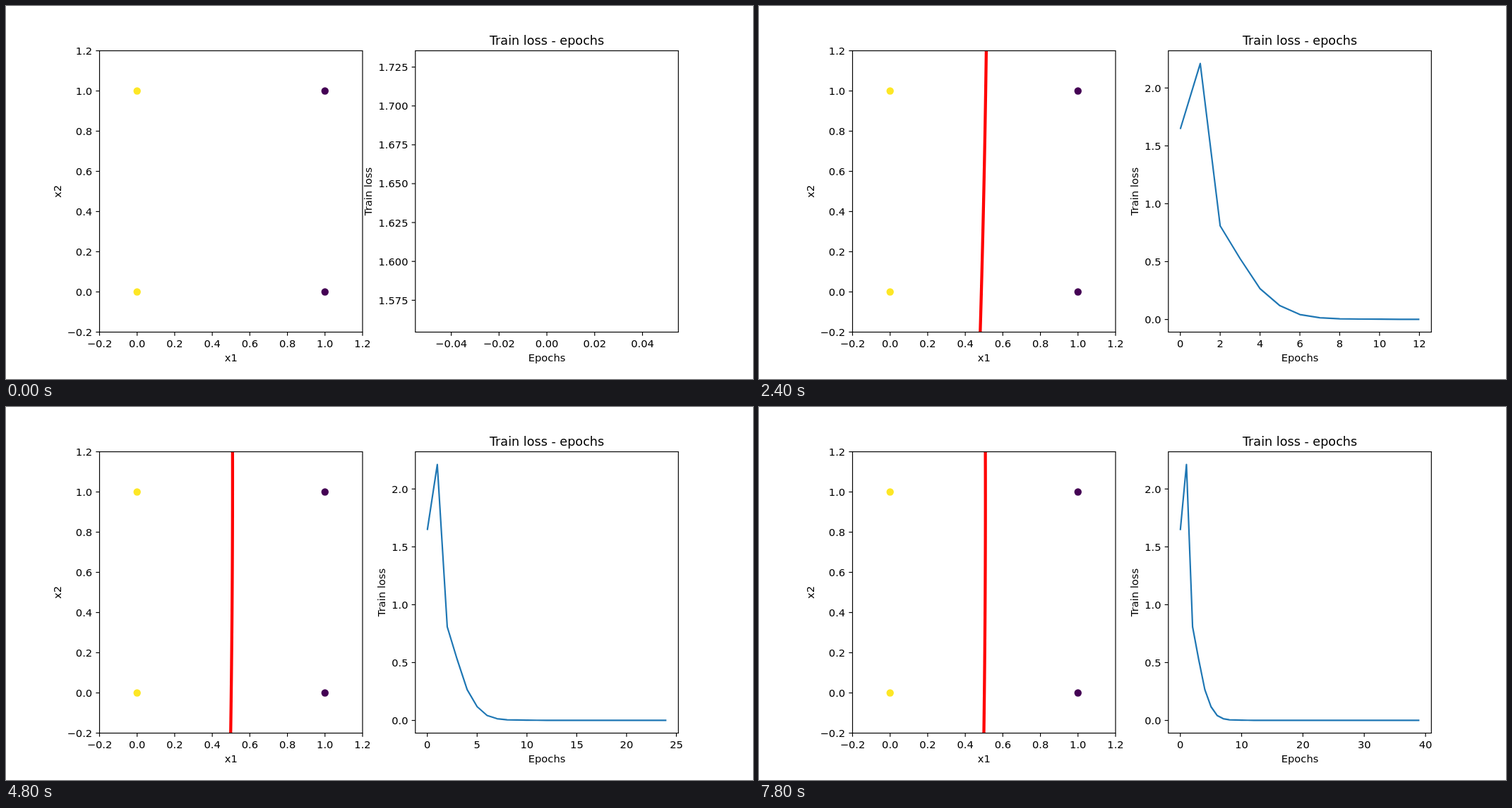
An HTML page with a canvas for the animation above (8000 ms loop, 1058 by 529 pixels).

```html
<!DOCTYPE html>
<html lang="en">
<head>
<meta charset="utf-8">
<title>Training progress</title>
<style>
  html, body { margin: 0; height: 100%; overflow: hidden; background: #fff; }
  canvas { display: block; }
</style>
</head>
<body>
<canvas id="stage" width="1058" height="529"></canvas>
<script>
const ctx = document.getElementById('stage').getContext('2d');
const STEP_MS = 200, EPOCHS = 40, PT = 1.469;
const TOP = 63.5, BOTTOM = 462.5, WIDTH = 372.5;

const losses = [1.645, 2.211, 0.809, 0.526, 0.266, 0.119, 0.043, 0.015, 0.006];
while (losses.length < EPOCHS) losses.push(0.001 + 0.005 * 0.55 ** (losses.length - 8));

// Decision boundary: [epoch, x1 at the top edge, x1 at the bottom edge]
const boundary = [
  [2, -0.12, -0.21], [3, 0.14, 0.08], [4, 0.33, 0.283], [5, 0.42, 0.37],
  [6, 0.47, 0.415], [7, 0.498, 0.441], [8, 0.511, 0.457], [11, 0.512, 0.477],
  [16, 0.511, 0.49], [24, 0.508, 0.498], [33, 0.507, 0.499], [39, 0.507, 0.499]
];

function boundaryAt(epoch) {
  const i = Math.max(1, boundary.findIndex(k => k[0] >= epoch));
  const a = boundary[i - 1], b = boundary[i];
  const f = (epoch - a[0]) / (b[0] - a[0]);
  return [1, 2].map(k => a[k] + (b[k] - a[k]) * f);
}

// Smallest round step that keeps the tick count within the limit
function tickStep(range, maxTicks) {
  const raw = range / maxTicks;
  const power = 10 ** Math.floor(Math.log10(raw));
  return power * [1, 2, 2.5, 5, 10].find(s => s * power >= raw - 1e-9);
}

function ticks(min, max, maxTicks) {
  const step = tickStep(max - min, maxTicks);
  let digits = 0;
  while (Math.abs(step - +step.toFixed(digits)) > 1e-9) digits++;
  const list = [];
  for (let i = Math.ceil(min / step - 1e-6); i * step <= max + 1e-9; i++) {
    const text = Math.abs(i * step).toFixed(digits);
    list.push({ value: i * step, text: (i < 0 ? '\u2212' : '') + text });
  }
  return list;
}

function limits(values) {
  let min = Math.min(...values), max = Math.max(...values);
  if (min === max) {
    const pad = Math.abs(min) * 0.05 || 0.05;
    min -= pad;
    max += pad;
  }
  const margin = (max - min) * 0.05;
  return [min - margin, max + margin];
}

function text(str, x, y, align = 'center', size = 10) {
  ctx.font = `${size * PT}px "DejaVu Sans", sans-serif`;
  ctx.textAlign = align;
  ctx.fillText(str, x, y);
}

function line(points, color, width) {
  ctx.strokeStyle = color;
  ctx.lineWidth = width;
  ctx.beginPath();
  points.forEach(p => ctx.lineTo(...p));
  ctx.stroke();
}

// Draws the ticks and labels, then the frame after the content
function axes(left, [x0, x1], [y0, y1], xLabel, yLabel, content) {
  const px = v => left + (v - x0) / (x1 - x0) * WIDTH;
  const py = v => BOTTOM - (v - y0) / (y1 - y0) * (BOTTOM - TOP);
  const tick = 3.5 * PT, thin = 0.8 * PT;
  let labelWidth = 0;

  ctx.fillStyle = '#000';
  for (const t of ticks(x0, x1, 8)) {
    const x = px(t.value);
    line([[x, BOTTOM], [x, BOTTOM + tick]], '#000', thin);
    text(t.text, x, 484.4);
  }
  for (const t of ticks(y0, y1, 9)) {
    const y = py(t.value);
    line([[left - tick, y], [left, y]], '#000', thin);
    text(t.text, left - 2 * tick, y + 5.4, 'right');
    labelWidth = Math.max(labelWidth, ctx.measureText(t.text).width);
  }
  text(xLabel, left + WIDTH / 2, 504.3);

  ctx.save();
  ctx.translate(left - 2 * tick - labelWidth - 9, (TOP + BOTTOM) / 2);
  ctx.rotate(-Math.PI / 2);
  text(yLabel, 0, 0);
  ctx.restore();

  ctx.save();
  ctx.beginPath();
  ctx.rect(left, TOP, WIDTH, BOTTOM - TOP);
  ctx.clip();
  content(px, py);
  ctx.restore();

  ctx.strokeStyle = '#000';
  ctx.lineWidth = thin;
  ctx.strokeRect(left, TOP, WIDTH, BOTTOM - TOP);
}

function drawBoundary(px, epoch) {
  const [top, bottom] = boundaryAt(epoch);
  const points = [];
  for (let f = 0; f <= 1.001; f += 0.05) {
    const x = top + (bottom - top) * f + 0.012 * f * (1 - f);
    points.push([px(x), TOP + (BOTTOM - TOP) * f]);
  }
  line(points, '#f00', epoch < 12 ? 4.8 : 4.3);
}

function draw(epoch) {
  ctx.fillStyle = '#fff';
  ctx.fillRect(0, 0, 1058, 529);

  axes(132.5, [-0.2, 1.2], [-0.2, 1.2], 'x1', 'x2', (px, py) => {
    for (const x of [0, 1]) for (const y of [0, 1]) {
      ctx.fillStyle = x ? '#440154' : '#fde725';
      ctx.beginPath();
      ctx.arc(px(x), py(y), 5.2, 0, 2 * Math.PI);
      ctx.fill();
    }
    if (epoch >= 2) drawBoundary(px, epoch);
  });

  const shown = losses.slice(0, epoch + 1);
  axes(579.8, limits([0, epoch]), limits(shown), 'Epochs', 'Train loss', (px, py) => {
    ctx.lineJoin = 'round';
    line(shown.map((v, i) => [px(i), py(v)]), '#1f77b4', 1.5 * PT);
  });
  text('Train loss - epochs', 579.8 + WIDTH / 2, 54.5, 'center', 12);
}

function loop() {
  draw(Math.floor(performance.now() / STEP_MS) % EPOCHS);
  requestAnimationFrame(loop);
}
loop();
</script>
</body>
</html>
```
